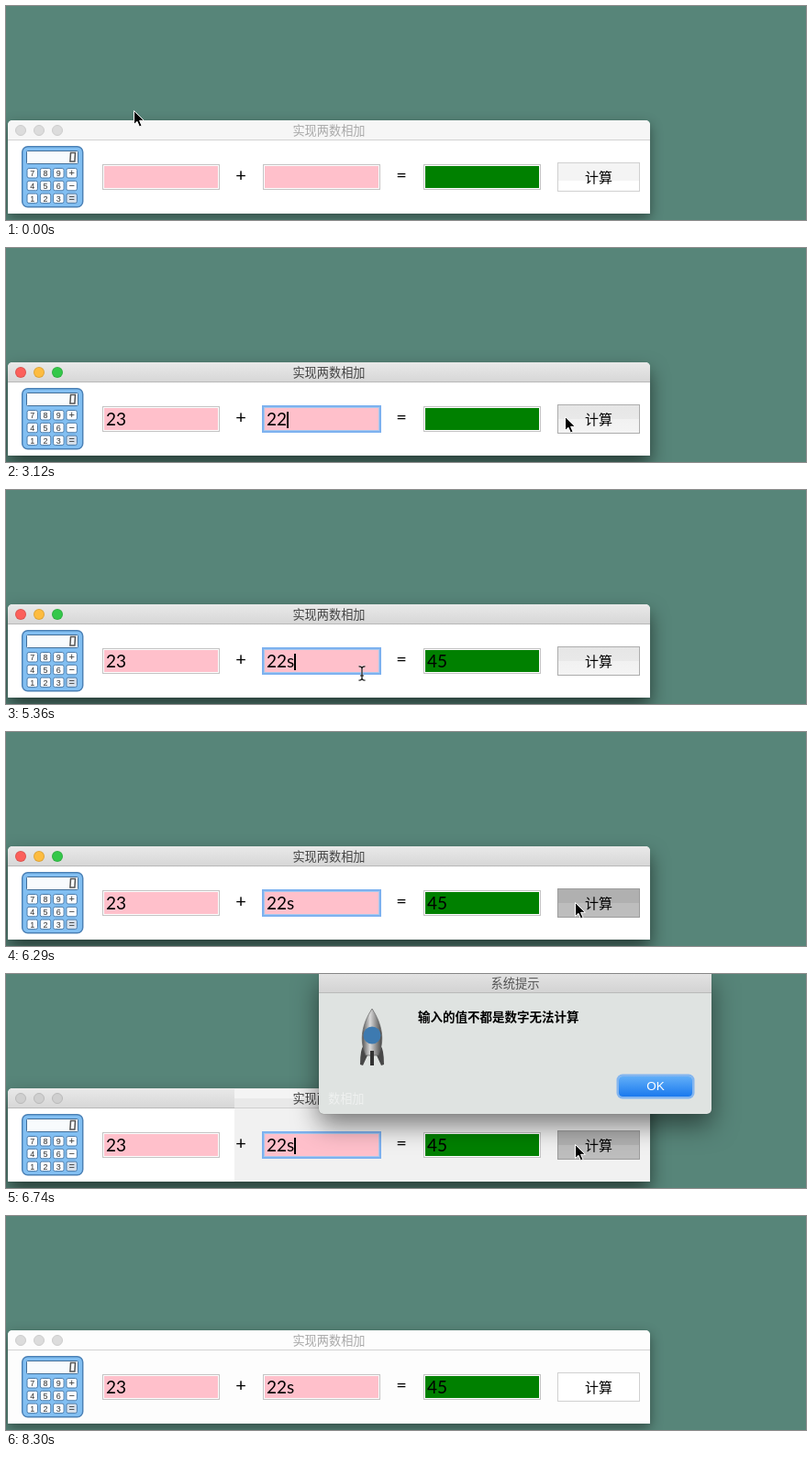
Recreate the animation shown at these times as an HTML page. Size 872 by 234 pixels, loop 8.42 s.

```html
<!DOCTYPE html>
<html lang="zh">
<head>
<meta charset="utf-8">
<title>实现两数相加</title>
<style>
html, body { margin: 0; width: 100%; height: 100%; overflow: hidden; background: #578579; }
#stage { position: relative; width: 872px; height: 234px; overflow: hidden; background: #578579; }
#stage div, #stage svg { position: absolute; box-sizing: border-box; white-space: pre; }
#stage { font-family: "Noto Sans CJK SC", "Noto Sans CJK", sans-serif; color: #000; }
.win { background: #fff; border-radius: 5px 5px 0 0; box-shadow: 0 5px 14px rgba(0,0,0,.42); }
.bar { background: #f6f6f6; border-bottom: 1px solid #d2d2d2; border-radius: 5px 5px 0 0; }
.title { font-size: 13.2px; line-height: 22px; text-align: center; color: #a9a9a9; }
.light { border-radius: 50%; background: #dcdcdc; border: 1px solid #cdcdcd; }
.on .win, .half .win { box-shadow: 0 10px 20px rgba(0,0,0,.55); }
.on .bar, .half .bar { background: linear-gradient(#e9e9e9, #d7d7d7); border-color: #b8b8b8; }
.on .title, .half .title { color: #444; }
.half .light { background: #cfcfcf; border-color: #bababa; }
.on .light { background: var(--c); border-color: rgba(0,0,0,.12); }
.pale .win, .pale .bar { background: #fdfdfd; }
.field { border: 1px solid #c3c3c3; background: #ffc0cb; box-shadow: inset 0 0 0 1px #fff; padding-left: 3px; }
.field, .sign { font: 19px/26px Lato, sans-serif; }
.sign { text-align: center; font-size: 20px; }
.result { background: #008000; }
.focus { border-color: #7fb2ee; box-shadow: 0 0 0 1px #7ab0f0, inset 0 0 0 1px #a9c8ee; }
.field i { display: inline-block; width: 1.5px; height: 18px; margin: 0 -1.5px 0 0; background: #000; vertical-align: -3px; }
.calc { font-size: 15px; line-height: 29px; text-align: center; border: 1px solid #d0d0d0; background: #fff; }
.calc.idle { background: linear-gradient(#f4f4f4 62%, #fff 62%); }
.calc.live { border-color: #acacac; background: linear-gradient(#e6e6e6, #e9e9e9 50%, #f1f1f1 50%, #f4f4f4); }
.calc.down { border-color: #9c9c9c; background: linear-gradient(#b0b0b0 50%, #bdbdbd 50%); }
.trace { background: linear-gradient(#f4f4f4 10px, #e9e9e9 10px 20px, #cfcfcf 20px 21px, #f1f1f1 21px); }
.dialog { background: #dfe3e1; border-radius: 0 0 5px 5px; box-shadow: 0 12px 28px rgba(0,0,0,.5), 0 0 1px rgba(0,0,0,.5); }
.dbar { background: linear-gradient(#e4e4e4, #d3d3d3); border-bottom: 1px solid #b9bab9; }
.dtitle { font-size: 13.3px; line-height: 20px; text-align: center; color: #555; }
.msg { font-size: 13.5px; font-weight: 700; line-height: 20px; }
.behind { font-size: 13.2px; line-height: 22px; color: rgba(255,255,255,.5); }
.ok { font: 13.5px/22px "Liberation Sans", Arial, sans-serif; color: #fff; text-align: center; border-radius: 4px;
  background: linear-gradient(#62aff8, #1a79ee); box-shadow: 0 0 0 2.5px #83b5ef; }
.ok.down { background: linear-gradient(#3f8be0, #0a58c4); }
</style>
</head>
<body>
<div id="stage"></div>
<script>
const LOOP = 8420;
const stage = document.getElementById('stage');

function box(cls, x, y, w, h, text = '', parent = stage) {
  const el = document.createElement('div');
  el.className = cls;
  el.style.cssText = `left:${x}px;top:${y}px;width:${w}px;height:${h}px`;
  el.textContent = text;
  parent.append(el);
  return el;
}

function drawing(x, y, w, h, body, parent = stage) {
  parent.insertAdjacentHTML('beforeend',
    `<svg width="${w}" height="${h}" viewBox="0 0 ${w} ${h}" style="left:${x}px;top:${y}px;overflow:visible">${body}</svg>`);
  return parent.lastElementChild;
}

function calculator() {
  const keys = [...'789+456−123='].map((k, i) => {
    const x = 6 + i % 4 * 14.3, y = 24.5 + Math.floor(i / 4) * 13.8;
    return `<rect x="${x}" y="${y}" width="11.5" height="10.5" rx="2" fill="${k === '=' ? '#d5dfea' : '#fafcff'}" stroke="#4c7cab"/>
      <text x="${x + 5.75}" y="${y + 8.5}" font-size="${i % 4 === 3 ? 11 : 9}" text-anchor="middle" fill="#333">${k}</text>`;
  }).join('');
  return `<rect x=".7" y=".7" width="66" height="66" rx="6" fill="#82bff2" stroke="#4b81b6" stroke-width="1.5"/>
    <rect x="5.5" y="5.5" width="56" height="14" rx="1" fill="#f8fbfd" stroke="#426e98"/>
    <path d="M53.5 7.5h5l-.6 9.5h-5z" fill="none" stroke="#555" stroke-width="1.5"/>
    <g font-family="Liberation Sans, sans-serif">${keys}</g>`;
}

const rocket = `<defs><linearGradient id="metal"><stop stop-color="#565656"/><stop offset=".4" stop-color="#d9d9d9"/>
  <stop offset="1" stop-color="#454545"/></linearGradient></defs>
  <path d="M4 40Q0 44 0 61L3 62 8 51 18 51 23 62 26 61Q26 44 22 40Z" fill="#484848"/>
  <path d="M13 0C2 17-1 34 6 51H20C27 34 24 17 13 0Z" fill="url(#metal)" stroke="#606060" stroke-width=".7"/>
  <path d="M11 46h4v16h-4z" fill="#333"/>
  <circle cx="13" cy="29" r="9.5" fill="#3d7ab0"/>`;

box('win', 2, 125, 700, 102);
box('bar', 2, 125, 700, 22);
const trace = box('trace', 249, 126, 453, 101);
['#fc605b', '#fdbc40', '#34c84a'].forEach((c, i) =>
  box('light', 10 + 20 * i, 130, 12, 12).style.setProperty('--c', c));
box('title', 2, 125, 700, 22, '实现两数相加');
drawing(17, 153, 67, 67, calculator());
const fields = [box('', 105, 173, 128, 28), box('', 280, 173, 128, 28)];
const result = box('field result', 455, 173, 128, 28);
box('sign', 246, 171, 20, 26, '+');
box('sign', 421, 171, 20, 26, '=');
const calc = box('calc', 601, 171, 90, 32, '计算');

const dialog = box('dialog', 341, -2, 428, 155);
box('dbar', 0, 0, 428, 23, '', dialog);
box('dtitle', 0, 2, 428, 20, '系统提示', dialog);
box('msg', 108, 38, 200, 20, '输入的值不都是数字无法计算', dialog);
box('behind', 10, 127, 60, 22, '数相加', dialog);
const ok = box('ok', 327, 114, 80, 22, 'OK', dialog);
drawing(45, 40, 26, 63, rocket, dialog);

const arrow = drawing(0, 0, 13, 19,
  '<path d="M.5.5V15.6L4 12.3 6.4 18 9 16.9 6.6 11.3H11.4Z" fill="#000" stroke="#fff"/>');
const beam = drawing(0, 0, 9, 17,
  `<g fill="none"><path id="b" d="M1 .8Q4.5.8 4.5 3.5V13.5Q4.5 16.2 1 16.2M8 .8Q4.5.8 4.5 3.5M4.5 13.5Q4.5 16.2 8 16.2M2.5 11h4" stroke="#fff" stroke-width="2.4" opacity=".5"/>
  <path d="M1 .8Q4.5.8 4.5 3.5V13.5Q4.5 16.2 1 16.2M8 .8Q4.5.8 4.5 3.5M4.5 13.5Q4.5 16.2 8 16.2M2.5 11h4" stroke="#111" stroke-width="1.2"/></g>`);

// Step tables: [start ms, value]
const look = [[0, ''], [420, 'on'], [6400, 'half'], [8300, 'pale']];
const typed = [
  [[0, ''], [950, '2'], [1130, '23']],
  [[0, ''], [2350, '2'], [2530, '22'], [5300, '22s']]
];
const focus = [[0, -1], [480, 0], [1950, 1], [7550, -1]];
const caret = [[0, 0], [500, 1], [3410, 0], [4420, 1], [5530, 0], [6480, 1], [7550, 0]];
const sum = [[0, ''], [3500, '45']];
const press = [[0, 'idle'], [420, 'live'], [3410, 'down'], [3520, 'live'], [6230, 'down'], [7550, '']];
const okPress = [[0, ''], [7260, 'down'], [7380, '']];
const traceWidth = [[0, 0], [6480, 453], [7550, 29], [8300, 0]];

// Pointer path: [ms, x, y]
const path = [
  [0, 139, 114], [60, 139, 114], [420, 165, 188], [1130, 165, 188], [1430, 195, 218],
  [1560, 195, 218], [1770, 353, 191], [2650, 353, 191], [3230, 635, 183], [3700, 635, 183],
  [4150, 281, 185], [4330, 281, 185], [4500, 306, 185], [4620, 306, 185], [5150, 388, 200],
  [5500, 388, 200], [6180, 620, 186], [6760, 620, 186], [7210, 694, 117], [7560, 694, 117],
  [8120, 760, -22], [LOOP, 760, -22]
];

const at = (steps, t) => steps.findLast(s => s[0] <= t)[1];
const clamp = v => Math.max(0, Math.min(1, v));
const ease = v => v * v * (3 - 2 * v);

function pointer(t) {
  const i = Math.max(1, path.findIndex(p => p[0] > t));
  const [t0, x0, y0] = path[i - 1], [t1, x1, y1] = path[i];
  const k = ease((t - t0) / (t1 - t0));
  return [Math.round(x0 + (x1 - x0) * k), Math.round(y0 + (y1 - y0) * k)];
}

const overField = (x, y) => y >= 173 && y <= 201 &&
  [105, 280, 455].some(left => x >= left && x <= left + 128);

function setHTML(el, html) {
  if (el.shown !== html) el.innerHTML = el.shown = html;
}

function render(t) {
  stage.className = at(look, t);
  fields.forEach((el, i) => {
    const active = at(focus, t) === i;
    el.className = active ? 'field focus' : 'field';
    setHTML(el, at(typed[i], t) + (active && at(caret, t) ? '<i></i>' : ''));
  });
  setHTML(result, at(sum, t));
  calc.className = 'calc ' + at(press, t);
  trace.style.width = at(traceWidth, t) + 'px';

  const open = t < 7550 ? ease(clamp((t - 6400) / 240)) : 0;
  dialog.style.opacity = open;
  dialog.style.transform = `scale(${0.9 + 0.1 * open})`;
  ok.className = 'ok ' + at(okPress, t);

  const [x, y] = pointer(t), text = overField(x, y);
  arrow.style.display = text ? 'none' : '';
  beam.style.display = text ? '' : 'none';
  arrow.style.transform = `translate(${x}px,${y}px)`;
  beam.style.transform = `translate(${x - 4.5}px,${y - 8}px)`;
}

const start = performance.now();
function tick() {
  render((performance.now() - start) % LOOP);
  requestAnimationFrame(tick);
}
tick();
</script>
</body>
</html>
```
